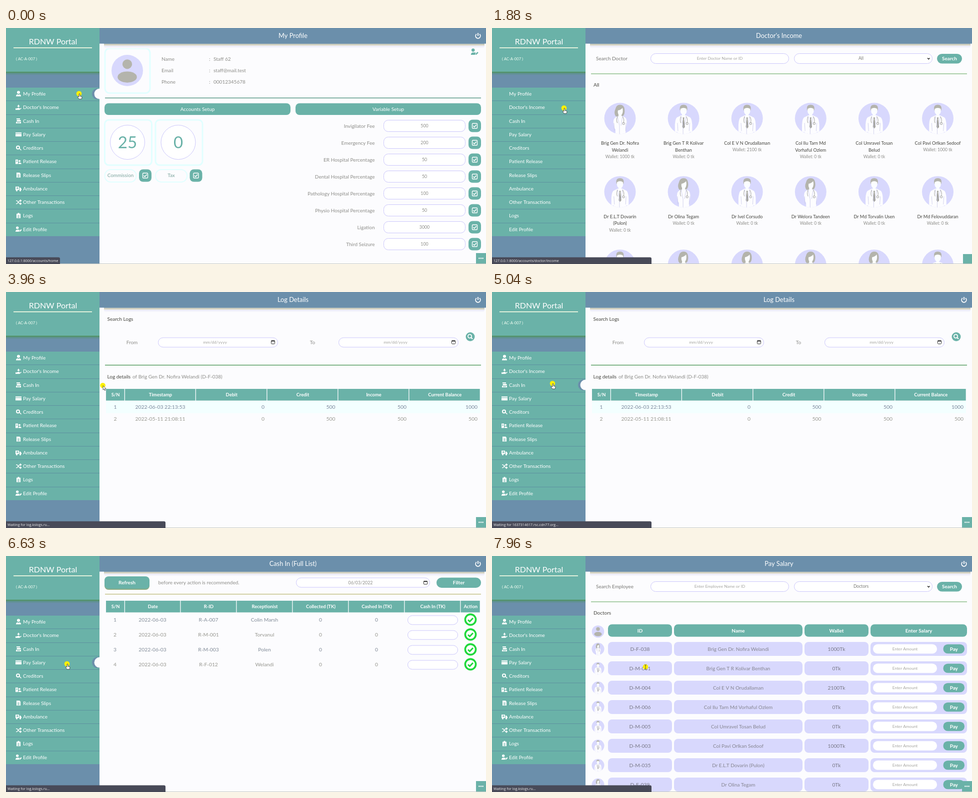
Write an HTML page with a canvas that moves like this. It is 960 px wide and 475 px high and loops after 8000 ms.

```html
<!DOCTYPE html>
<html lang="en">
<head>
<meta charset="utf-8">
<title>Portal tour</title>
<style>
html, body { margin: 0; width: 100%; height: 100%; overflow: hidden; background: #fcfcfe; }
canvas { display: block; width: 960px; height: 475px; }
</style>
</head>
<body>
<canvas id="stage" width="960" height="475"></canvas>
<script>
const ctx = document.getElementById('stage').getContext('2d');
const LOOP = 8000;
const TEAL = '#6ab2a8', BLUE = '#6b8fab', LAV = '#d8d8fd', EDGE = '#ccc8fb', ICE = '#e2ffff';
const PAGE = '#fcfcfe', GREY = '#8c8c88', DARK = '#45453f', HAIR = '#b4b4ac', WHITE = '#fff';

const MENU = ['My Profile', "Doctor's Income", 'Cash In', 'Pay Salary', 'Creditors', 'Patient Release',
  'Release Slips', 'Ambulance', 'Other Transactions', 'Logs', 'Edit Profile'];
const menuY = i => 132.6 + i * 27.25;

// id, name lines, wallet, gender
const DOCTORS = [
  ['D-F-038', 'Brig Gen Dr. Nofira|Welandi', 1000, 'F'],
  ['D-M-001', 'Brig Gen T R Kolivar|Benthan', 0, 'M'],
  ['D-M-004', 'Col E V N Orudallaman', 2100, 'M'],
  ['D-M-006', 'Col Ilu Tarn Md|Vorhaful Ozlem', 0, 'M'],
  ['D-M-005', 'Col Umravel Tosan|Belud', 0, 'M'],
  ['D-M-003', 'Col Pavi Orlkan Sedoof', 1000, 'M'],
  ['D-M-035', 'Dr E.L.T Dovarin|(Pulon)', 0, 'M'],
  ['D-F-039', 'Dr Olina Tegam', 0, 'F'],
  ['', 'Dr Ivel Corsudo', 0, 'M'],
  ['', 'Dr Welora Tandeen', 0, 'F'],
  ['', 'Dr Md Torvalin Usen', 0, 'M'],
  ['', 'Dr Md Felovuddaran', 0, 'M']
];
const fullName = d => d[1].replace('|', ' ');

function text(s, x, y, size, color, align = 'left', weight = 400, font = 'Lato') {
  ctx.font = `${weight} ${size}px ${font}, sans-serif`;
  ctx.textAlign = align;
  ctx.textBaseline = 'alphabetic';
  ctx.fillStyle = color;
  ctx.fillText(s, x, y + size * 0.35);
}
const mid = (s, x, y, size, color, weight) => text(s, x, y, size, color, 'center', weight);

function rect(x, y, w, h, color) {
  ctx.fillStyle = color;
  ctx.fillRect(x, y, w, h);
}
function box(x, y, w, h, r, fill, stroke, lw = 1) {
  ctx.beginPath();
  ctx.roundRect(x, y, w, h, r);
  if (fill) { ctx.fillStyle = fill; ctx.fill(); }
  if (stroke) { ctx.strokeStyle = stroke; ctx.lineWidth = lw; ctx.stroke(); }
}
function disc(x, y, r, fill, stroke, lw = 1) {
  ctx.beginPath();
  ctx.arc(x, y, r, 0, Math.PI * 2);
  if (fill) { ctx.fillStyle = fill; ctx.fill(); }
  if (stroke) { ctx.strokeStyle = stroke; ctx.lineWidth = lw; ctx.stroke(); }
}
function line(color, lw, ...p) {
  ctx.beginPath();
  for (let i = 0; i < p.length; i += 2) ctx.lineTo(p[i], p[i + 1]);
  ctx.strokeStyle = color;
  ctx.lineWidth = lw;
  ctx.stroke();
}
function shape(d, fill, stroke, lw = 1) {
  const p = new Path2D(d);
  if (fill) { ctx.fillStyle = fill; ctx.fill(p); }
  if (stroke) { ctx.strokeStyle = stroke; ctx.lineWidth = lw; ctx.stroke(p); }
}
function at(x, y, k, draw) {
  ctx.save();
  ctx.translate(x, y);
  ctx.scale(k, k);
  draw();
  ctx.restore();
}

function button(s, x, y, w, h, r, size = 10, weight = 400) {
  box(x, y, w, h, r, TEAL);
  mid(s, x + w / 2, y + h / 2, size, WHITE, weight);
}
function field(s, x, y, w, h, r = h / 2, size = 8.3) {
  box(x + .5, y + .5, w - 1, h - 1, r, WHITE, EDGE);
  if (s) mid(s, x + w / 2, y + h / 2, size, '#a4a4a0');
}
function calendar(x, y) {
  box(x - 3.5, y - 3, 7, 6.5, 1, null, '#333');
  rect(x - 3.5, y - 3.5, 7, 2, '#333');
}
function tick(x, y) {
  box(x - 12.5, y - 12.5, 25, 25, 8, TEAL);
  box(x - 5, y - 5, 10, 10, 1.5, null, WHITE, 1.4);
  line(WHITE, 1.6, x - 3, y, x - .8, y + 2.3, x + 3.2, y - 2.2);
}

function person(x, y, r) {
  disc(x, y, r, LAV);
  at(x, y, r / 31, () => {
    disc(0, -12.5, 9.5, HAIR);
    ctx.beginPath();
    ctx.ellipse(0, 13, 19, 11, 0, 0, Math.PI * 2);
    ctx.fill();
  });
}

function doctor(x, y, r, female) {
  at(x, y, r / 31, () => {
    disc(0, 0, 31, LAV);
    ctx.clip();
    const coat = female
      ? 'M-4 -5L-9 -2Q-13 0 -13 9L-11 19 -9 22V32H11V20L13 12Q14 1 10 -2L4 -5Z'
      : 'M-5 -6L-13 -2Q-16 0 -17 12V27H-12V32H12V27H17V12Q16 0 13 -2L5 -6Z';
    shape(coat, '#fdfdff');
    if (female) {
      shape('M-8 -4Q-13 -10 -9 -19 -7 -27 0 -27 8 -27 9 -18 10 -9 6 -5Z', HAIR);
      shape('M-4 -16Q2 -17 5 -21Q7 -12 3 -7V-3L0 1 -3 -3V-8Q-5 -11 -4 -16Z', '#fbfdff');
    } else {
      shape('M-7 -16Q-9 -27 0 -27 9 -27 7 -16Z', HAIR);
      shape('M-6 -19Q0 -23 6 -19Q7 -11 3 -8V-4L0 0 -3 -4V-8Q-7 -11 -6 -19Z', '#fbfdff');
      shape('M-1.6 -2H1.6L1 1 2.6 17 0 20 -2.6 17 -1 1Z', '#a2a29c');
    }
    shape('M-5 -4Q-8 4 -5 9M5 -4Q9 2 7 8', null, '#a8a8a6', 1);
    disc(7, 10, 2, null, '#a8a8a6', 1);
    shape('M-5 -4L-1 14V32M5 -4L2 14M-12 9L-11 25M12 9L11 25', null, '#c9c9e8', .8);
  });
}

// Menu icons in a 12 by 12 cell centred on the origin
const ICONS = [
  'M-3 -3a3 3 0 1 1 6 0a3 3 0 1 1 -6 0M-5 5Q-5 1 -1 1L0 3 1 1Q5 1 5 5Z',
  'M-6 2H-3L-1 1H2V3L5 1 6 2 2 5H-6ZM-1 -5H1V-3H3L0 0 -3 -3H-1Z',
  'M-4 -5H3V-3H-4ZM-3 -2H4L5 1H-4ZM-5 2H5V5H-5Z',
  'M-6 -4H6V-2H-6ZM-6 -1H6V4H-6Z',
  'M-5 -1a4 4 0 1 1 8 0a4 4 0 1 1 -8 0M2 2L3 1 6 4 5 5Z',
  'M-6 -4H-1V5H-6ZM0 -1a2 2 0 1 1 4 0a2 2 0 1 1 -4 0M0 5V3Q2 1 5 3L6 5Z',
  'M-4 -5H2L4 -3V5H-4Z',
  'M-6 -4H1V3H-6ZM2 -2H4L6 1V3H2ZM-5 4a1.5 1.5 0 1 1 3 0a1.5 1.5 0 1 1 -3 0M2 4a1.5 1.5 0 1 1 3 0a1.5 1.5 0 1 1 -3 0',
  '',
  'M-4 -4H-1.5V-5.5H1.5V-4H4V5H-4Z',
  'M-5 -3a2.7 2.7 0 1 1 5.4 0a2.7 2.7 0 1 1 -5.4 0M-6 5Q-6 1 -2 1L2 1 1 5ZM2 3L5 0 6.5 1.5 3.5 4.5 2 5Z'
];
function icon(i, x, y, color = WHITE, k = 1) {
  at(x, y, k, () => {
    if (i === 8) {
      shape('M-5 -3H-3L2 3H5M-5 3H-3L2 -3H5M3 -5L5.5 -3 3 -1M3 1L5.5 3 3 5', null, color, 1.4);
    } else shape(ICONS[i], color);
    if (i === 4) disc(-1, -1, 2, TEAL);
    if (i === 6 || i === 9) [-1, 1, 3].forEach(v => rect(-2, v, 4, .9, TEAL));
    if (i === 2) rect(-3, 3, 6, .8, TEAL);
    if (i === 5) rect(-4.5, -2, 2, 2, TEAL);
    if (i === 7) { rect(-3, -3, 1.2, 4, TEAL); rect(-4.4, -1.6, 4, 1.2, TEAL); }
  });
}

function sidebar(hover, ready) {
  rect(0, 0, 187, 475, BLUE);
  rect(0, 0, 187, 89, TEAL);
  const g = ctx.createLinearGradient(0, 88, 0, 95);
  g.addColorStop(0, '#4f9355');
  g.addColorStop(.4, '#5b9188');
  g.addColorStop(1, BLUE);
  rect(0, 88, 187, 7, g);
  mid('RDNW Portal', 94, 27, 16, WHITE);
  rect(15, 39, 157, 1.6, '#fbffe6');
  text('( AC-A-007 )', 20, 62, 7.6, '#f4fff4');
  rect(0, 120, 187, 299, TEAL);
  MENU.forEach((s, i) => {
    const y = menuY(i);
    if (i) rect(0, Math.round(y - 13.6), 187, 1, '#5d92a0');
    text(s, 34, y, 10, WHITE);
    if (ready) icon(i, 25, y);
  });
  if (ready && hover >= 0) {
    ctx.save();
    ctx.beginPath();
    ctx.rect(0, 120, 188, 300);
    ctx.clip();
    disc(183, menuY(hover), 11, BLUE);
    disc(187, menuY(hover), 10.5, PAGE);
    ctx.restore();
  }
}

function header(title, ready) {
  const g = ctx.createLinearGradient(0, 31, 0, 41);
  g.addColorStop(0, '#a3b0bd');
  g.addColorStop(.3, '#dcd8bd');
  g.addColorStop(.55, '#ececfa');
  g.addColorStop(1, PAGE);
  box(196, 31, 761, 10, [0, 0, 5, 5], g);
  rect(187, 0, 773, 31.5, BLUE);
  mid(title, 574, 15.5, 12.8, WHITE);
  if (!ready) {
    rect(942, 455, 18, 20, TEAL);
    return;
  }
  rect(940, 453, 20, 22, TEAL);
  ctx.beginPath();
  ctx.arc(944, 16, 4.8, -.9, Math.PI + .9);
  ctx.strokeStyle = WHITE;
  ctx.lineWidth = 1.8;
  ctx.stroke();
  line(WHITE, 1.8, 944, 10, 944, 16);
  [-3.6, 0, 3.6].forEach(d => disc(950 + d, 463.5, 1.3, WHITE));
}

const rule = (y, color, h = 1.5) => rect(198, y, 752, h, color);

function searchBar(label, hint, choice) {
  text(label, 208, 61, 10, '#777773');
  field(hint, 317, 51, 277, 21);
  field('', 604, 51, 277, 21);
  mid(choice, 738, 61, 8.6, '#777773');
  line('#222', 1.4, 871, 60.5, 873.2, 62.8, 875.5, 60.5);
  button('Search', 890, 52, 50, 19.5, 10, 10, 700);
  rule(91.5, '#8fc08c');
  text(choice, 203, 114.5, 10, DARK);
}

function profilePage() {
  box(198, 41, 90, 90, 9, PAGE, ICE, 3);
  person(242.5, 85.5, 31.5);
  [['Name', 'Staff 62'], ['Email', 'staff@mail.test'], ['Phone', '00012345678']].forEach(([k, v], i) => {
    const y = 62 + i * 23.4;
    text(k, 311, y, 10, GREY);
    text(':', 406, y, 10, GREY);
    text(v, 415, y, 10, GREY);
  });
  icon(10, 937, 48, TEAL, 1.2);
  rule(140, '#5f9c8b');
  button('Accounts Setup', 197, 151.5, 372, 23.5, 8);
  button('Variable Setup', 579, 151.5, 371, 23.5, 8);
  [['25', 'Commission', 244.5], ['0', 'Tax', 346]].forEach(([n, s, x]) => {
    box(x - 47, 185, 94, 91, 8, PAGE, ICE, 3);
    disc(x - 1.5, 230, 34.5, WHITE, EDGE);
    mid(n, x - 1.5, 230, 33, TEAL);
    box(x - 47, 285, 63, 25, 12, PAGE, ICE, 2);
    mid(s, x - 15.5, 297, 9.8, '#7aa49c');
    tick(x + 34, 297);
  });
  const fees = ['Invigilator Fee:500', 'Emergency Fee:200', 'ER Hospital Percentage:50', 'Dental Hospital Percentage:50',
    'Pathology Hospital Percentage:100', 'Physio Hospital Percentage:50', 'Ligation:3000', 'Third Seizure:100'];
  fees.forEach((f, i) => {
    const [k, v] = f.split(':'), y = 197 + i * 34;
    text(k, 737.5, y, 10, GREY, 'right');
    field('', 755, y - 12, 164, 24, 9);
    mid(v, 837, y, 8.8, GREY);
    tick(937.5, y);
  });
}

function incomePage() {
  searchBar('Search Doctor', 'Enter Doctor Name or ID', 'All');
  for (let i = 0; i < 18; i++) {
    const x = 256 + (i % 6) * 127.1, y = 182 + Math.floor(i / 6) * 147.7;
    const d = DOCTORS[i];
    doctor(x, y, 31.5, d ? d[3] === 'F' : i > 12 && i < 17);
    if (!d) continue;
    const names = d[1].split('|');
    names.forEach((s, n) => mid(s, x, y + 50 + n * 13.5, 9.1, DARK));
    mid(`Wallet: ${d[2]} tk`, x, y + 50 + names.length * 13.4, 8.6, GREY);
  }
}

function tableHead(y, edges, labels) {
  labels.forEach((s, i) => {
    rect(edges[i], y, edges[i + 1] - edges[i] - 1.3, 23.5, TEAL);
    mid(s, (edges[i] + edges[i + 1]) / 2, y + 12, 9.4, WHITE, 700);
  });
}

function logPage() {
  text('Search Logs', 202.5, 54, 10, DARK);
  [['From', 252, 304], ['To', 613, 665]].forEach(([s, x, px]) => {
    mid(s, x, 101.5, 10, GREY);
    field('', px, 91.5, 240, 20);
    mid('mm/dd/yyyy', px + 114, 101.5, 8.4, '#a4a4a0');
    calendar(px + 230, 101);
  });
  disc(928.5, 90, 9, TEAL);
  disc(927.5, 89, 3.6, null, WHITE, 1.8);
  line(WHITE, 2, 930, 91.5, 933, 94.5);
  rule(146.5, '#5aa065');
  text('Log details', 202.5, 170, 10, DARK);
  text('of ' + fullName(DOCTORS[0]) + ' (D-F-038)', 253, 170, 10, GREY);
  rect(200, 219, 748, 25, '#f3ffff');
  tableHead(195, [200, 238, 380, 522.5, 664.5, 806.5, 949],
    ['S/N', 'Timestamp', 'Debit', 'Credit', 'Income', 'Current Balance']);
  [['1', '2022-06-03 22:13:53', 1000], ['2', '2022-05-11 21:08:11', 500]].forEach(([n, stamp, sum], i) => {
    const y = 231 + i * 24.5, c = i ? '#989890' : '#78859a';
    mid(n, 218.5, y, 10.4, c);
    mid(stamp, 308.5, y, 10.4, c);
    [[0, 517], [500, 658.5], [500, 801], [sum, 943]].forEach(([v, x]) => text(v, x, y, 10.4, c, 'right'));
  });
}

function cashPage() {
  box(197, 43, 90, 25, 8, '#8cab80');
  button('Refresh', 197, 41, 90, 25, 8, 10, 700);
  text('before every action is recommended.', 304.5, 53.5, 10, GREY);
  field('', 580, 43.5, 268, 20);
  mid('06/03/2022', 709, 53.5, 8.8, GREY);
  calendar(839, 53.5);
  button('Filter', 861, 43.5, 89, 20.5, 10, 10, 700);
  rule(76, '#c6c489');
  tableHead(90, [200, 238, 349.5, 461.5, 573.5, 685.5, 797.5, 909.5, 949],
    ['S/N', 'Date', 'R-ID', 'Receptionist', 'Collected (TK)', 'Cashed In (TK)', 'Cash In (TK)', 'Action']);
  [['R-A-007', 'Colin Marsh'], ['R-M-001', 'Torvanul'], ['R-M-003', 'Polen'], ['R-F-012', 'Welandi']].forEach(([id, name], i) => {
    const y = 128.5 + i * 30, c = i % 2 ? '#96968f' : '#818b98';
    [[i + 1, 218], ['2022-06-03', 293], [id, 405], [name, 517], [0, 629], [0, 741]]
      .forEach(([s, x]) => mid(s, x, y, 10.3, c));
    field('', 803, y - 9, 101, 19);
    disc(929, y - .5, 10.6, WHITE, '#20d83c', 3.6);
    line('#20d83c', 3, 924, y, 927.5, y + 3.3, 934, y - 3.5);
  });
}

function salaryPage() {
  searchBar('Search Employee', 'Enter Employee Name or ID', 'Doctors');
  const cols = [[232, 128], [364, 257], [625, 128], [757, 193]];
  person(212, 152, 12.3);
  ['ID', 'Name', 'Wallet', 'Enter Salary'].forEach((s, i) => button(s, cols[i][0], 137.5, cols[i][1], 25, 8, 10, 700));
  DOCTORS.slice(0, 8).forEach((d, i) => {
    const y = 187 + i * 39;
    doctor(212, y, 12.5, d[3] === 'F');
    cols.forEach(([x, w]) => box(x, y - 14, w, 28, 8, LAV));
    mid(d[0], 296, y, 10.3, '#777785');
    mid(fullName(d), 492.5, y, 10, '#858590');
    mid(d[2] + 'Tk', 689, y, 10.3, '#777785');
    box(762, y - 9.5, 128, 19, 9.5, WHITE);
    mid('Enter Amount', 826, y, 8.2, '#a4a4a0');
    button('Pay', 902.5, y - 9.3, 42.5, 18.6, 9, 10, 700);
  });
}

function status(s, width) {
  box(0, 461.5, width, 14, [0, 3, 0, 0], '#484a58');
  text(s, 3, 468.5, 7.05, '#eeeeee', 'left', 400, '"Open Sans"');
}

const CDN = 'Waiting for 1637314617.rsc.cdn77.org...', LOGS = 'Waiting for log.kslogs.ru...';
const LINK = '127.0.0.1:8000/accounts/';
// until, text, width
const STATUS = [[170, LINK + 'home', 108], [1640, '', 0], [1790, LINK + 'doctor/income', 138],
  [1960, LINK + 'doctor/income', 319], [2950, CDN, 319], [4200, LOGS, 319], [6400, CDN, 319], [LOOP, LOGS, 319]];

// until, title, draw, icons ready from
const PAGES = [[1790, 'My Profile', profilePage, 0], [2950, "Doctor's Income", incomePage, 1960],
  [5330, 'Log Details', logPage, 3050], [7420, 'Cash In (Full List)', cashPage, 0], [LOOP, 'Pay Salary', salaryPage, 7500]];

// time, x, y
const TRACK = [[130, 146, 132], [650, 900, 60], [800, 940, 20], [960, 930, 40], [1700, 144, 161], [1960, 144, 161],
  [2620, 287, 174], [2690, 287, 174], [2800, 260, 186], [3000, 260, 186], [3460, 818, 232], [3970, 193, 188],
  [4400, 918, 228], [5020, 121, 184], [5330, 121, 184], [5710, 905, 192], [6210, 905, 192], [6620, 122, 217],
  [7420, 122, 217], [7940, 307, 223]];

function pointer(t) {
  const i = TRACK.findIndex(k => k[0] > t);
  if (i === 0) return TRACK[0].slice(1);
  if (i < 0) return TRACK[TRACK.length - 1].slice(1);
  const a = TRACK[i - 1], b = TRACK[i], u = (t - a[0]) / (b[0] - a[0]);
  const e = u * u * (3 - 2 * u);
  return [a[1] + (b[1] - a[1]) * e, a[2] + (b[2] - a[2]) * e];
}

function cursor(x, y, kind) {
  disc(x, y, 5.3, '#fdf000');
  at(x, y, 1, () => {
    if (kind === 'hand') {
      shape('M0 1Q1 -1 2 1V5L5 6Q6 6 6 8L5 11H0L-3 7Q-2 5 0 7Z', WHITE, '#333', .8);
    } else if (kind === 'beam') {
      shape('M-2 -4Q0 -4 0 -3Q0 -4 2 -4M0 -3V4M-2 5Q0 5 0 4Q0 5 2 5', null, '#444', .9);
    } else {
      shape('M.5 .5V9L2.5 7.2 4 10.3 5.3 9.7 3.9 6.7H6.5Z', WHITE, '#333', .8);
    }
  });
}

function frame(now) {
  const t = now % LOOP;
  const [, title, page, readyAt] = PAGES.find(p => t < p[0]);
  const ready = t >= readyAt;
  const [x, y] = pointer(t);
  const hover = x < 187 && y > 119 && y < 419 ? Math.round((y - 132.6) / 27.25) : -1;
  const onCard = page === incomePage && Math.hypot(x - 256, y - 182) < 30;
  const onText = page === salaryPage && x > 270 && x < 320 && y > 215;

  rect(0, 0, 960, 475, PAGE);
  page();
  header(title, ready);
  sidebar(hover, ready);
  rect(0, 474, 960, 1, '#c4c8c4');
  const [, msg, width] = STATUS.find(s => t < s[0]);
  if (msg) status(msg, width);
  cursor(x, y, hover >= 0 || onCard ? 'hand' : onText ? 'beam' : 'arrow');
}

const start = performance.now();
function run() {
  frame(Math.max(0, performance.now() - start));
  requestAnimationFrame(run);
}
run();
</script>
</body>
</html>
```
